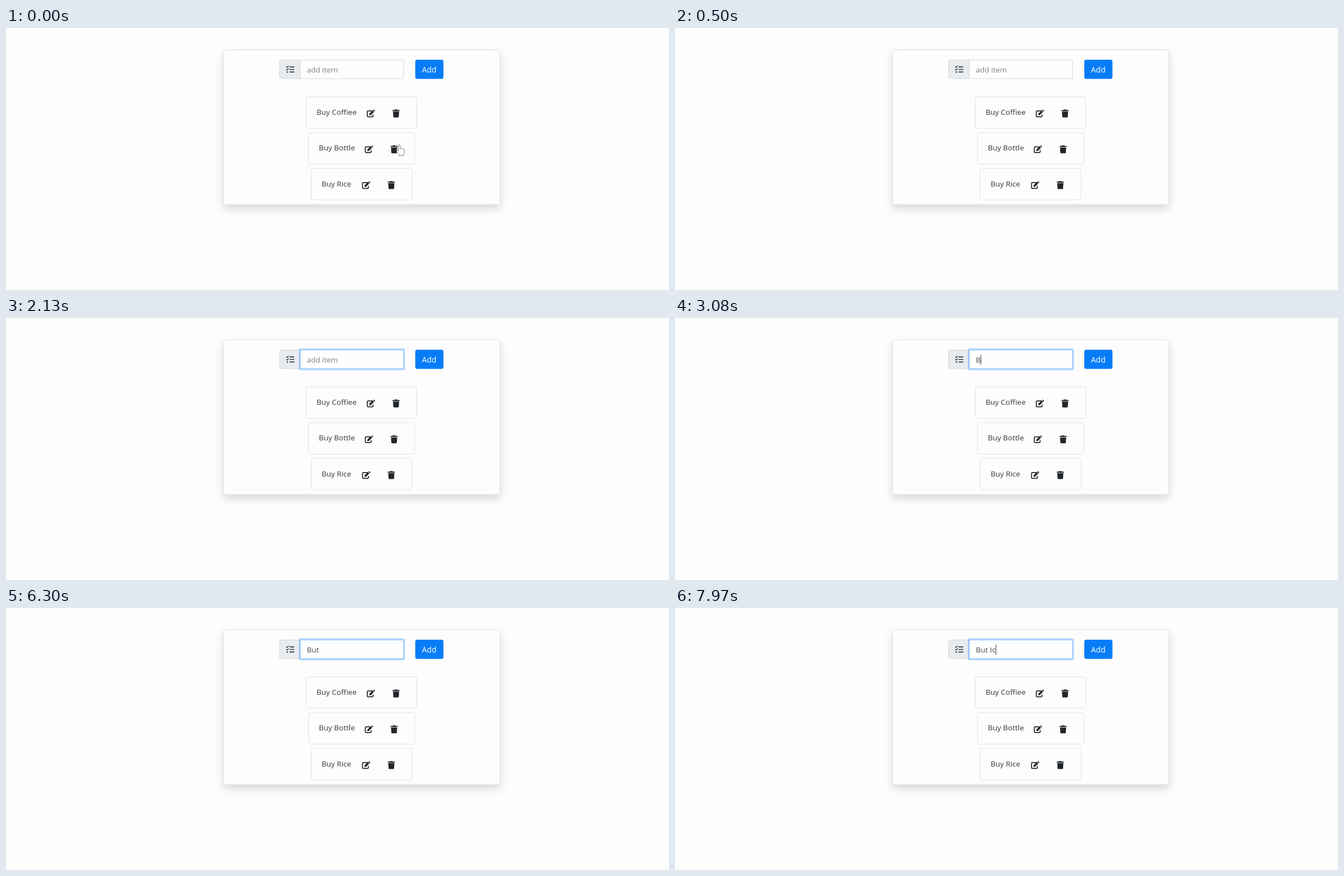
Write an HTML page that moves like this. It is 1189 px wide and 471 px high and loops after 8000 ms.

```html
<!DOCTYPE html>
<html lang="en">
<head>
<meta charset="utf-8">
<title>Shopping list</title>
<style>
  html, body { margin: 0; width: 100%; height: 100%; overflow: hidden; background: #fdfdfd; }
  svg { display: block; width: 100%; height: 100%; }
  text { font: 13.5px "Open Sans", "Noto Sans", sans-serif; font-variant-ligatures: none; white-space: pre; }
</style>
</head>
<body>
<svg viewBox="0 0 1189 471" xmlns="http://www.w3.org/2000/svg">
  <defs>
    <filter id="shadow" x="-10%" y="-15%" width="120%" height="135%">
      <feDropShadow dx="0" dy="7.2" stdDeviation="7.2" flood-color="#000" flood-opacity=".15"/>
    </filter>
    <g id="edit">
      <path d="M3 -4.6H-5.2Q-6.6 -4.6 -6.6 -3.2V4.4Q-6.6 5.8 -5.2 5.8H2.4Q3.8 5.8 3.8 4.4V1.6" fill="none" stroke="#212529" stroke-width="1.7"/>
      <path d="M-3.2 3.2L-2.7 0L3.2 -5.4L5.5 -3L-0.2 2.8ZM3.9 -6.1L4.7 -6.8Q5.4 -7.2 6 -6.6L7.1 -5.5Q7.6 -4.9 7.1 -4.4L6.2 -3.6Z" fill="#212529"/>
    </g>
    <g id="trash" fill="#212529">
      <path d="M-6.3 -6.2H-2.9L-2.2 -7.2H2.2L2.9 -6.2H6.3V-4.3H-6.3Z"/>
      <path d="M-5.5 -3.5H5.5L4.9 5.8Q4.8 7 3.6 7H-3.6Q-4.8 7 -4.9 5.8Z"/>
    </g>
  </defs>

  <rect width="1189" height="471" fill="#fdfdfd"/>
  <rect x="390.5" y="39.5" width="495" height="277.5" rx="2" fill="#fdfdfd" stroke="#e3e4ee" filter="url(#shadow)"/>

  <path d="M528 57.5H493.5Q490.5 57.5 490.5 60.5V88Q490.5 91 493.5 91H528Z" fill="#e9ecef" stroke="#d3d8dd"/>
  <g fill="none" stroke="#343a40" stroke-width="1.7">
    <path d="M508.5 69.8H517M508.5 74.5H517M508.5 79.2H517"/>
    <path d="M502.6 69.4L504.1 70.9L506.8 68M502.6 74.2L504.1 75.7L506.8 72.8" stroke-width="1.4"/>
    <path d="M503.3 79.2H505.7" stroke-width="2.2"/>
  </g>

  <rect id="glow" x="525" y="54.5" width="190.5" height="39.5" rx="3" fill="#007bff" fill-opacity=".27"/>
  <rect id="field" x="527.8" y="57.5" width="185" height="33.5" rx="1" fill="#fefefe"/>
  <text id="value" x="539.5" y="80.3"></text>
  <path id="caret" d="M0 66V84" stroke="#343a40"/>

  <rect x="734" y="57" width="50.5" height="34.5" rx="3.5" fill="#067df7"/>
  <text x="746" y="79.5" fill="#fff" style="font-size:14px">Add</text>

  <g id="rows"></g>

  <circle id="click" cx="569" cy="75" r="18" fill="none" stroke="#c8364a" stroke-width="1.2"/>
  <g id="pointer" fill="#fff" stroke-linejoin="round">
    <path id="hand" stroke="#777" d="M-1.5 1.2Q0 -1 1.6 1.2V7Q3.2 5.6 4.4 7.4Q6 6.4 7 8.2Q9 7.4 9.3 9.6V14Q9.2 16.5 7.8 18V20H0V18.4L-4.3 12.6Q-5.4 10.2 -3.6 10L-1.5 12Z"/>
    <path id="arrow" stroke="#333" d="M0 0V16L3.7 12.5L6.3 18.4L8.8 17.3L6.2 11.6H11.3Z"/>
  </g>
</svg>
<script>
const LOOP = 8000, BLINK = 530, FOCUS = 1150;
const KEYS = [[2900, "B"], [3550, "u"], [4240, "t"], [6800, " "], [7350, "I"], [7750, "c"]];
const ITEMS = [["Buy Coffiee", 538.5, 736.5], ["Buy Bottle", 542.5, 733], ["Buy Rice", 547.5, 728]];

const $ = id => document.getElementById(id);
const show = (id, on) => $(id).setAttribute("visibility", on ? "visible" : "hidden");
const clamp = v => Math.max(0, Math.min(1, v));

$("rows").innerHTML = ITEMS.map(([label, left, right], i) => {
  const y = 123.8 + i * 64.35;
  return `<rect x="${left}" y="${y}" width="${right - left}" height="56.5" rx="3" fill="#fdfdfd" stroke="#dfe2e8"/>
    <text x="${left + 18.5}" y="${y + 32}" fill="#33373b">${label}</text>
    <use href="#edit" x="${right - 82}" y="${y + 30}"/>
    <use href="#trash" x="${right - 37}" y="${y + 30}"/>`;
}).join("");

function drawField(t) {
  const focus = clamp((t - FOCUS) / 150);
  const mix = (a, b) => Math.round(a + (b - a) * focus);
  $("glow").setAttribute("opacity", focus);
  $("field").setAttribute("stroke", `rgb(${mix(211, 128)},${mix(216, 189)},${mix(221, 250)})`);

  const typed = KEYS.filter(([at]) => at <= t);
  const value = typed.map(([, key]) => key).join("");
  const text = $("value");
  text.textContent = value || "add item";
  text.setAttribute("fill", value ? "#495057" : "#7b838a");

  const width = value ? text.getComputedTextLength() : 0;
  $("caret").setAttribute("transform", `translate(${Math.round(539 + width) + 0.5} 0)`);
  const since = t - (typed.length ? typed[typed.length - 1][0] : FOCUS);
  show("caret", since >= 0 && since % (2 * BLINK) < BLINK);
}

function drawPointer(t) {
  const p = clamp((t - 30) / 420);
  const ease = p * p * (3 - 2 * p);
  const x = 705 - 136 * ease, y = 209.5 - 134.5 * ease;
  $("pointer").setAttribute("transform", `translate(${x} ${y})`);
  const overField = y < 91;
  const overIcon = y > 203;
  show("hand", overIcon);
  show("arrow", !overIcon && !overField);
  show("click", t >= FOCUS && t < 1400);
}

function draw(now) {
  const t = now % LOOP;
  drawField(t);
  drawPointer(t);
}

const start = performance.now();
function tick() {
  draw(performance.now() - start);
  requestAnimationFrame(tick);
}
tick();
</script>
</body>
</html>
```
